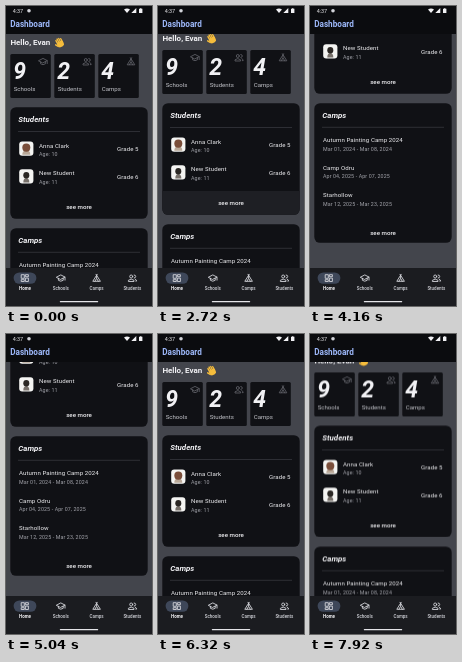
An HTML page for the animation above (8 s loop, 146 by 300 pixels).

```html
<!DOCTYPE html>
<html lang="en">
<head>
<meta charset="utf-8">
<title>Dashboard</title>
<style>
  html, body { margin: 0; width: 100%; height: 100%; overflow: hidden; background: #0b0c0f; }
  svg { display: block; width: 146px; height: 300px; font-family: Roboto, sans-serif; fill: #f1f1f4; }
  .page { animation: scroll 8s infinite; }
  .press { fill: #1e1f24; opacity: 0; animation: press 8s step-end infinite; }
  .h1 { font-size: 8px; font-weight: 700; }
  .h2 { font-size: 7.9px; font-weight: 700; font-style: italic; }
  .num { font-size: 23px; font-weight: 700; font-style: italic; }
  .label { font-size: 6.1px; fill: #c3c4ca; }
  .item { font-size: 6.1px; letter-spacing: .08px; }
  .sub { font-size: 5.3px; letter-spacing: .12px; fill: #a3a4ab; }
  .more { font-size: 6.2px; font-weight: 500; text-anchor: middle; }
  .end { text-anchor: end; }
  .nav { font-size: 4.5px; font-weight: 500; text-anchor: middle; fill: #d3d4da; }
  .nav.on { font-weight: 700; fill: #f1f1f4; }
  .card { fill: #101115; }
  .rule { stroke: #3a3b42; stroke-width: .7; }
  .icon { fill: none; stroke: #d3d4da; stroke-width: .9; stroke-linejoin: round; stroke-linecap: round; }
  .dim { stroke: #5c5d64; }

  /* Swipes advance in 80 ms ticks and rest in between. */
  @keyframes scroll {
    0%    { transform: translateY(0); animation-timing-function: step-end; }
    32%   { transform: translateY(0); animation-timing-function: steps(2); }
    34%   { transform: translateY(-4px); animation-timing-function: steps(2); }
    36%   { transform: translateY(-13px); animation-timing-function: step-end; }
    38%   { transform: translateY(-13px); animation-timing-function: steps(2); }
    40%   { transform: translateY(-18px); animation-timing-function: step-end; }
    41%   { transform: translateY(-18px); animation-timing-function: steps(4); }
    45%   { transform: translateY(-88.6px); animation-timing-function: step-end; }
    46%   { transform: translateY(-88.6px); animation-timing-function: steps(3); }
    49%   { transform: translateY(-111px); animation-timing-function: step-end; }
    50%   { transform: translateY(-111px); animation-timing-function: steps(2); }
    52%   { transform: translateY(-125px); animation-timing-function: step-end; }
    61%   { transform: translateY(-125px); animation-timing-function: steps(2); }
    63%   { transform: translateY(-120px); animation-timing-function: step-end; }
    64%   { transform: translateY(-120px); animation-timing-function: steps(4); }
    68%   { transform: translateY(-74.6px); animation-timing-function: step-end; }
    70%   { transform: translateY(-74.6px); animation-timing-function: steps(2); }
    72%   { transform: translateY(-51px); animation-timing-function: step-end; }
    73%   { transform: translateY(-51px); animation-timing-function: steps(3); }
    76%   { transform: translateY(-8px); animation-timing-function: step-end; }
    79%   { transform: translateY(0); animation-timing-function: step-end; }
    94%   { transform: translateY(-1px); animation-timing-function: step-end; }
    99%, 100% { transform: translateY(-9.6px); animation-timing-function: step-end; }
  }
  @keyframes press {
    0%, 36% { opacity: 0; }
    33% { opacity: 1; }
  }
</style>
</head>
<body>
<svg viewBox="0 0 146 300">
  <defs>
    <clipPath id="view"><rect y="28" width="146" height="234"/></clipPath>
    <g id="school"><path d="M-4.2-1 0-3.2 4.2-1 0 1.2ZM-2.4 .2V2.2Q0 4 2.4 2.2V.2M4.2-1V2"/></g>
    <g id="people"><circle cx="-1.2" cy="-1.6" r="1.5"/><path d="M-4 3V2.2Q-1.2-.2 1.6 2.2V3ZM1.8-3.1a1.5 1.5 0 0 1 0 3M2.8 1Q4.2 1.6 4.2 3H3.4"/></g>
    <g id="tent"><path d="M.6-3.8-3.8 3.2H3.8L-.6-3.8M0-2.6V-.4M-1.7 3.2 0 .2 1.7 3.2"/></g>
    <g id="grid"><path d="M-3.4-3.4H-.7V.2H-3.4ZM.8-3.4H3.4V-1.4H.8ZM-3.4 1.6H-.7V3.4H-3.4ZM.8 0H3.4V3.4H.8Z"/></g>
  </defs>

  <rect width="146" height="300" fill="#43454c"/>
  <g clip-path="url(#view)">
    <g class="page">
      <text class="h1" x="4.4" y="39.3">Hello, Evan</text>
      <g transform="translate(53.8 36.5) rotate(-28)" fill="#f6bd3c">
        <rect x="-3.3" y="-1" width="6.6" height="5.6" rx="2.4"/>
        <rect x="-3.2" y="-4.2" width="1.4" height="6" rx=".7"/>
        <rect x="-1.5" y="-5" width="1.4" height="6" rx=".7"/>
        <rect x=".2" y="-4.7" width="1.4" height="6" rx=".7"/>
        <rect x="1.9" y="-3.6" width="1.4" height="5" rx=".7"/>
        <rect x="-5" y="-.8" width="1.5" height="4.4" rx=".7" transform="rotate(-30 -4 1)"/>
      </g>

      <g id="stats"></g>

      <rect class="card" x="4.3" y="101.2" width="137.4" height="111.6" rx="5.7"/>
      <text class="h2" x="12.3" y="116">Students</text>
      <path class="rule" d="M12 125.5H134"/>
      <g id="students"></g>
      <path class="press" d="M4.3 189H141.7V207.1a5.7 5.7 0 0 1-5.7 5.7H10a5.7 5.7 0 0 1-5.7-5.7Z"/>
      <text class="more" x="73" y="203">see more</text>

      <rect class="card" x="4.3" y="222.2" width="137.4" height="139.6" rx="5.7"/>
      <text class="h2" x="12.3" y="237">Camps</text>
      <path class="rule" d="M12 246.3H134"/>
      <g id="camps"></g>
      <text class="more" x="73" y="354">see more</text>
    </g>
  </g>

  <rect width="146" height="28" fill="#0b0c0f"/>
  <text x="6.7" y="7" font-size="5.4">4:37</text>
  <circle cx="23" cy="4.8" r="1.8" fill="#d3d4da"/>
  <path d="M118 3.6Q121 1.2 124 3.6L121 7ZM130.3 2V7H125.3ZM133 2.8H134V2.2H135.4V2.8H136.4V7H133Z"/>
  <text x="4.2" y="21.2" font-size="8.2" font-weight="700" fill="#9db8fa">Dashboard</text>

  <rect y="262" width="146" height="38" fill="#1b1c20"/>
  <rect x="7.6" y="266.4" width="22.8" height="11.4" rx="5.7" fill="#3e4759"/>
  <g id="tabs"></g>
  <rect x="53.8" y="295" width="38.4" height="1.3" rx=".65" fill="#e4e4e8"/>
</svg>
<script>
  const fill = (id, rows, draw) => {
    document.getElementById(id).innerHTML = rows.map(draw).join('');
  };
  const text = (cls, x, y, s) => `<text class="${cls}" x="${x}" y="${y}">${s}</text>`;
  const icon = (name, x, y, cls = '') =>
    `<use href="#${name}" class="icon ${cls}" transform="translate(${x} ${y})"/>`;

  fill('stats', [[9, 'Schools', 'school'], [2, 'Students', 'people'], [4, 'Camps', 'tent']],
    ([n, label, name], i) => {
      const x = 4.3 + i * 44;
      return `<rect class="card" x="${x}" y="48" width="40.5" height="44" rx="1.5"/>` +
        text('num', x + 3, 73.3, n) + text('label', x + 3.4, 84.6, label) +
        icon(name, x + 32.7, 55.6, 'dim');
    });

  fill('students', [['Anna Clark', 10, 5, '#7a4e3a', '#b9a898'], ['New Student', 11, 6, '#2b2724', '#77706a']],
    ([name, age, grade, head, body], i) => {
      const y = 135.6 + i * 27.7;
      return `<rect x="13.2" y="${y}" width="14.2" height="14.2" rx="3" fill="#f4f4f2"/>` +
        `<path d="M${16.3 + i} ${y + 13.2}q0-4.5 ${4 - i}-4.5t${4 - i} 4.5Z" fill="${body}"/>` +
        `<ellipse cx="20.3" cy="${y + 6}" rx="${4 - i}" ry="${4.2 - i}" fill="${head}"/>` +
        text('item', 33, y + 6, name) + text('sub', 33, y + 14.2, 'Age: ' + age) +
        text('item end', 132.6, y + 9.8, 'Grade ' + grade);
    });

  fill('camps', [
    ['Autumn Painting Camp 2024', 'Mar 01, 2024 - Mar 08, 2024'],
    ['Camp Odru', 'Apr 04, 2025 - Apr 07, 2025'],
    ['Starhollow', 'Mar 12, 2025 - Mar 23, 2025']
  ], ([name, dates], i) => {
    const y = 260.8 + i * 27.7;
    return text('item', 13, y, name) + text('sub', 13, y + 8.9, dates);
  });

  fill('tabs', [['Home', 'grid'], ['Schools', 'school'], ['Camps', 'tent'], ['Students', 'people']],
    ([label, name], i) => {
      const x = 19 + i * 35.8;
      return icon(name, x, 272.1) + text(i ? 'nav' : 'nav on', x, 284, label);
    });
</script>
</body>
</html>
```
